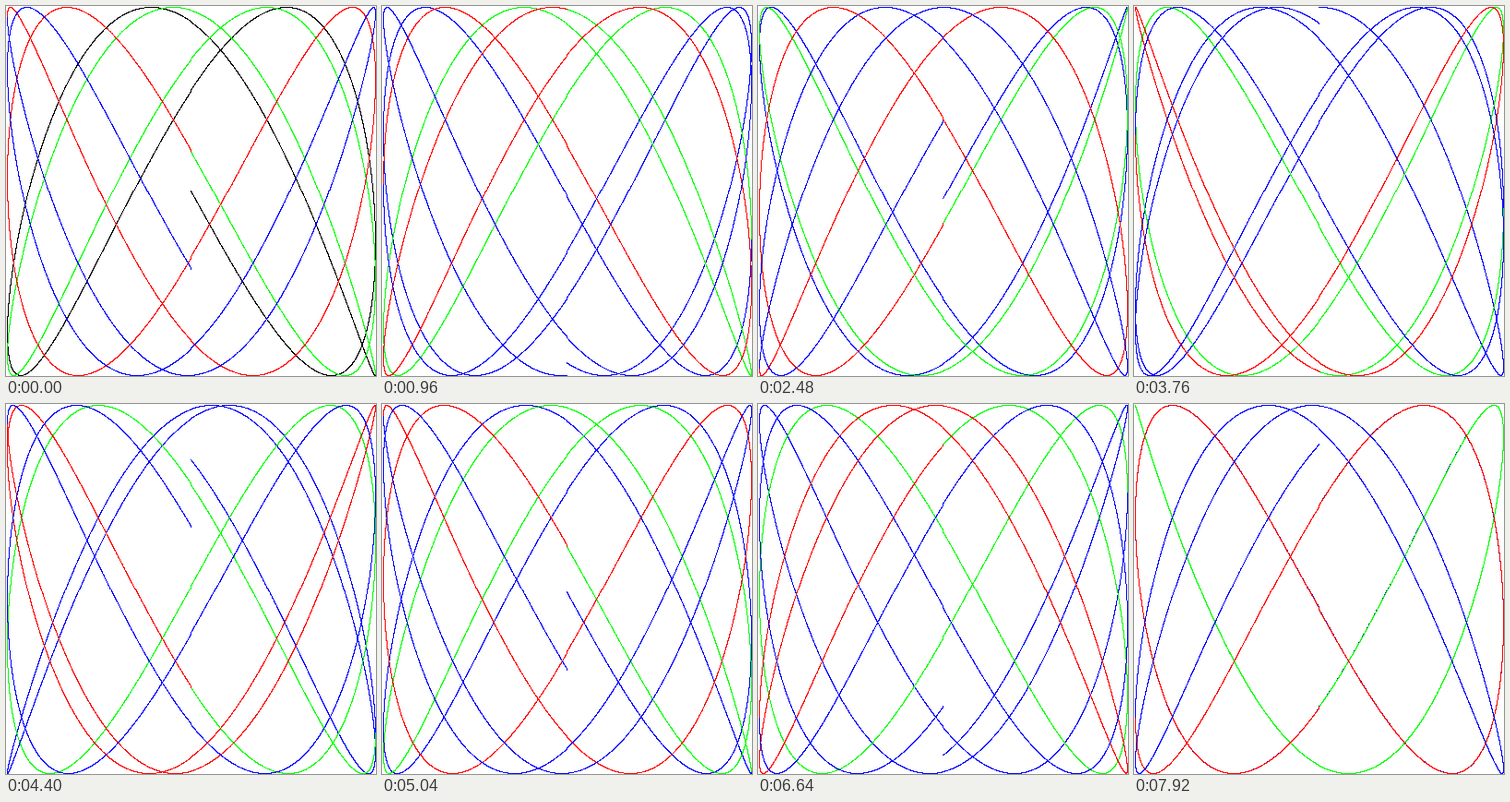
An HTML page with a canvas that plays this animation: 401 by 401 pixels, repeating every 8 s.

```html
<!DOCTYPE html>
<html lang="en">
<head>
<meta charset="utf-8">
<title>Lissajous</title>
<style>
  html, body { margin: 0; width: 100%; height: 100%; overflow: hidden; background: #fff; }
  canvas { display: block; width: 401px; height: 401px; image-rendering: pixelated; }
</style>
</head>
<body>
<canvas id="stage" width="401" height="401"></canvas>
<script>
const RADIUS = 200;
const SIDE = 2 * RADIUS + 1;
const SPAN = 10 * Math.PI;      // five turns of the x oscillator
const STEP = 0.001;
const FREQ = 1.8139808639388588;
const PHASE_STEP = 0.1;
const FRAME_MS = 80;
const FRAMES = 100;

// 32-bit pixels in ABGR order
const WHITE = 0xffffffff, BLACK = 0xff000000;
const GREEN = 0xff00ff00, RED = 0xff0000ff, BLUE = 0xffff0000;

const ctx = document.getElementById("stage").getContext("2d");
const image = ctx.createImageData(SIDE, SIDE);
const pixels = new Uint32Array(image.data.buffer);

// Truncation toward zero gives the small jog at the centre lines.
const toPixel = v => RADIUS + Math.trunc(v * RADIUS + 0.5);

function draw(frame) {
  const phase = frame * PHASE_STEP;
  // The pen keeps its last colour, so only the opening frame starts black.
  const pens = [frame === 0 ? BLACK : BLUE, GREEN, RED, BLUE];
  pixels.fill(WHITE);
  for (let t = 0; t < SPAN; t += STEP) {
    const x = toPixel(Math.sin(t));
    const y = toPixel(Math.sin(t * FREQ + phase));
    pixels[y * SIDE + x] = pens[Math.floor(4 * t / SPAN)];
  }
  ctx.putImageData(image, 0, 0);
}

const start = performance.now();
let shown = -1;

function tick() {
  const frame = Math.floor((performance.now() - start) / FRAME_MS) % FRAMES;
  if (frame !== shown) {
    draw(frame);
    shown = frame;
  }
  requestAnimationFrame(tick);
}
tick();
</script>
</body>
</html>
```
